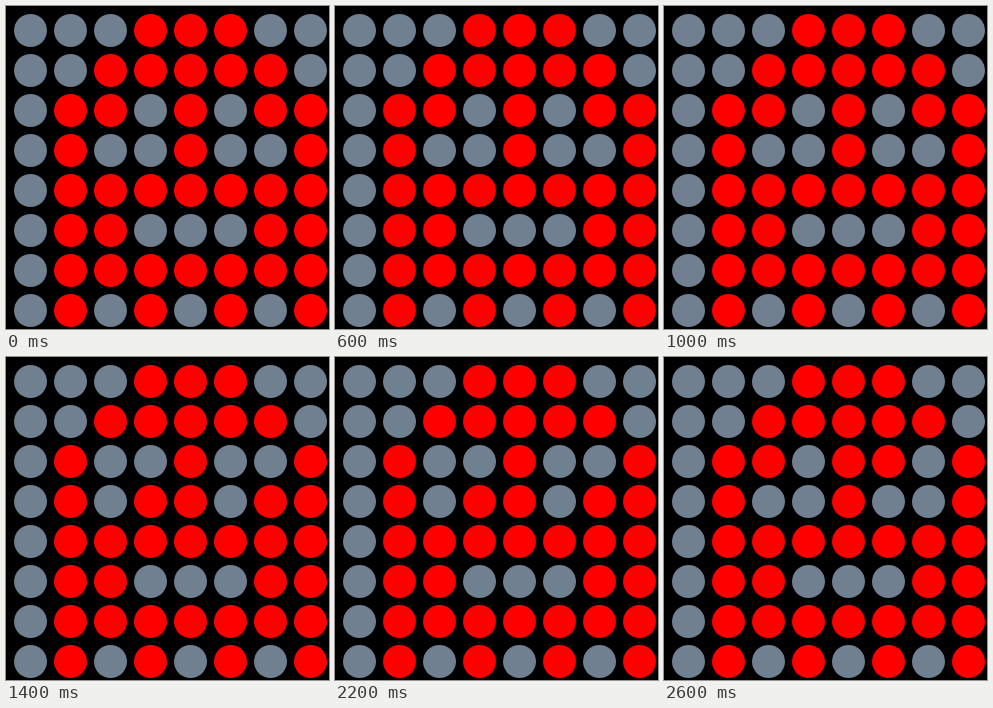
An HTML page that plays this animation: 323 by 323 pixels, repeating every 2.8 s.

```html
<!DOCTYPE html>
<html lang="en">
<head>
<meta charset="utf-8">
<title>Dot ghost</title>
<style>
  html, body { margin: 0; width: 100%; height: 100%; overflow: hidden; background: #000; }
  svg { display: block; width: 323px; height: 323px; }
</style>
</head>
<body>
<svg id="board" viewBox="0 0 323 323"></svg>
<script>
const OFF = '#708090', ON = '#ff0000';
const SIZE = 8, PITCH = 40, STEP = 200, LOOP = 2800;

// Ghost body with empty eyes; pupils are placed on top
const BODY = [
  '...###..',
  '..#####.',
  '.#..#..#',
  '.#..#..#',
  '.#######',
  '.##...##',
  '.#######',
  '.#.#.#.#'
];
const EYES = [2, 5], EYE_ROW = 2;

// Pupil positions in an eye, clockwise
const TURN = [[0, 0], [1, 0], [1, 1], [0, 1]];

const board = document.getElementById('board');
const dots = Array.from({ length: SIZE * SIZE }, (_, i) => {
  const dot = document.createElementNS('http://www.w3.org/2000/svg', 'circle');
  dot.setAttribute('cx', 24.5 + PITCH * (i % SIZE));
  dot.setAttribute('cy', 24.5 + PITCH * Math.floor(i / SIZE));
  dot.setAttribute('r', 16.5);
  return board.appendChild(dot);
});

// Wiggle sideways first, then roll the eyes
function pose(step) {
  const rolling = step >= 6;
  const right = rolling ? (step - 5) % 4 : 1;
  const left = rolling ? right : 0;
  const shift = step === 2 || step === 4 ? 1 : 0;
  return { shift, pupils: [left, right] };
}

function draw(step) {
  const { shift, pupils } = pose(step);
  const grid = BODY.map(row => [...row].map(c => c === '#'));
  pupils.forEach((p, i) => {
    const [dx, dy] = TURN[p];
    grid[EYE_ROW + dy][EYES[i] + dx] = true;
  });
  dots.forEach((dot, i) => {
    const row = Math.floor(i / SIZE), col = (i + shift) % SIZE;
    dot.setAttribute('fill', grid[row][col] ? ON : OFF);
  });
}

let shown = -1;
const start = performance.now();
function tick() {
  const time = (performance.now() - start) % LOOP;
  const step = Math.floor(time / STEP);
  if (step !== shown) draw(shown = step);
  requestAnimationFrame(tick);
}
tick();
</script>
</body>
</html>
```
